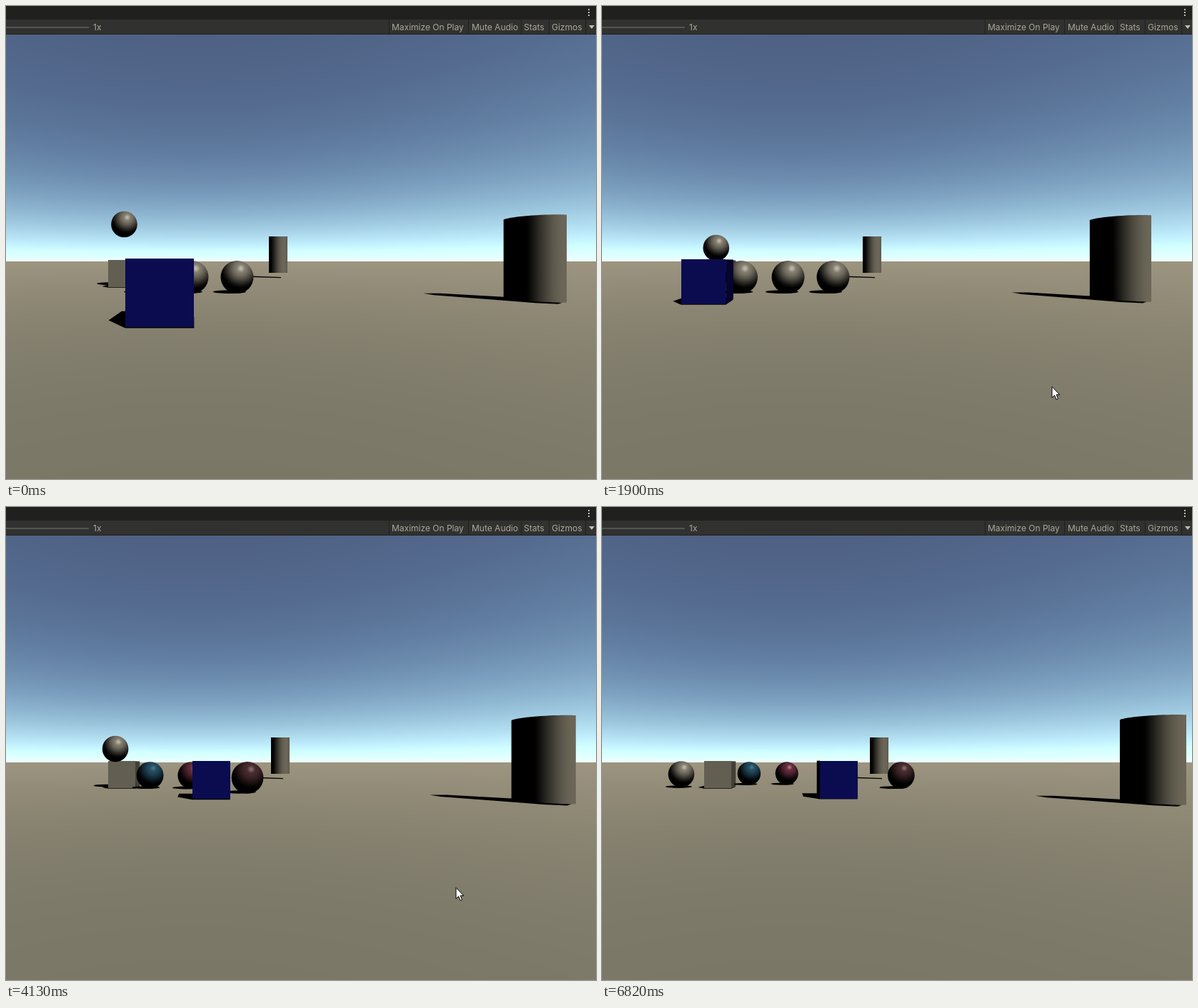
Write an HTML page with a canvas that moves like this. It is 826x663 px and loops after 6.9 s.

```html
<!DOCTYPE html>
<html lang="en">
<head>
<meta charset="utf-8">
<title>Game view</title>
<style>
  html, body { margin: 0; width: 100%; height: 100%; overflow: hidden; background: #20201f; }
  canvas { display: block; }
</style>
</head>
<body>
<canvas id="view" width="826" height="663"></canvas>
<script>
const W = 826, H = 663, LOOP = 6900;

// Camera: vanishing point, focal length and height above the ground.
const VX = 263, VY = 358, FOCAL = 463, EYE = 0.955;
// Shadow shift per unit of height: to the left and away from the camera.
const SHIFT_X = -0.41, SHIFT_Z = 0.65;

const GRAY = [142, 135, 120], TEAL = [38, 84, 106], MAROON = [110, 50, 68], BROWN = [80, 48, 52];
const ctx = document.getElementById('view').getContext('2d');

const clamp = v => Math.min(1, Math.max(0, v));
const mix = (a, b, k) => a + (b - a) * k;
const progress = (t, from, to) => clamp((t - from) / (to - from));
const rgb = (color, light) => `rgb(${color.map(c => Math.round(c * light))})`;

function rect(g, x, y, w, h, fill) {
  const left = Math.round(x), top = Math.round(y);
  g.fillStyle = fill;
  g.fillRect(left, top, Math.round(x + w) - left, Math.round(y + h) - top);
}

function polygon(points, fill) {
  ctx.fillStyle = fill;
  ctx.beginPath();
  points.forEach(([x, y]) => ctx.lineTo(x, y));
  ctx.closePath();
  ctx.fill();
}

function ellipse(x, y, rx, ry, fill) {
  ctx.fillStyle = fill;
  ctx.beginPath();
  ctx.ellipse(x, y, rx, ry, 0, 0, Math.PI * 2);
  ctx.fill();
}

// Sky and ground fade exponentially with the elevation of the view ray.
function skyColor(e) {
  return [74 + 165 * Math.exp(-6.4 * e), 88 + 198 * Math.exp(-5.4 * e), 120 + 168 * Math.exp(-4.6 * e)];
}

function groundColor(e) {
  const glow = Math.exp(-5 * e);
  return [120 + 37 * glow, 117 + 32 * glow, 101 + 27 * glow];
}

function makeBackdrop() {
  const layer = document.createElement('canvas');
  layer.width = W;
  layer.height = H;
  const g = layer.getContext('2d'), image = g.createImageData(W, H);
  for (let y = 40; y < H; y++) {
    for (let x = 0; x < W; x++) {
      const dy = VY - y, e = dy / Math.hypot(FOCAL, x - VX, dy);
      image.data.set([...(e > 0 ? skyColor(e) : groundColor(-e)), 255], (y * W + x) * 4);
    }
  }
  g.putImageData(image, 0, 0);
  drawToolbar(g);
  return layer;
}

function drawToolbar(g) {
  rect(g, 0, 0, W, 19, '#20201e');
  rect(g, 0, 19, W, 20, '#31312f');
  rect(g, 0, 39, W, 1, '#20201e');
  rect(g, 0, 29, 116, 2, '#555550');
  for (const x of [536, 647, 721, 760, 811]) rect(g, x, 19, 1, 20, '#20201e');
  for (const y of [4, 8, 12]) rect(g, 815, y, 2, 2, '#c0bdae');
  g.fillStyle = '#aba898';
  g.font = '12px Inter, "Liberation Sans", sans-serif';
  const labels = [['1x', 122], ['Maximize On Play', 540], ['Mute Audio', 652], ['Stats', 725], ['Gizmos', 764]];
  for (const [text, x] of labels) g.fillText(text, x, 34);
  g.fillStyle = '#c0bdae';
  g.beginPath();
  g.moveTo(816, 27);
  g.lineTo(824, 27);
  g.lineTo(820, 32);
  g.fill();
}

// A unit cube; x is its left side and z its front, in world units.
function drawCube(x, z, front, rightSide) {
  const s = FOCAL / z, back = FOCAL / (z + 1);
  const ground = (dx, dz) => {
    const scale = FOCAL / (z + dz);
    return [VX + (x + dx) * scale, VY + (EYE + .015) * scale];
  };
  polygon([ground(0, 0), ground(SHIFT_X, SHIFT_Z), ground(SHIFT_X, 1 + SHIFT_Z),
           ground(1 + SHIFT_X, 1 + SHIFT_Z), ground(1, 1), ground(1, 0)], '#000');
  const side = (edge, fill) => polygon([
    [VX + edge * s, VY - (1 - EYE) * s], [VX + edge * back, VY - (1 - EYE) * back],
    [VX + edge * back, VY + EYE * back], [VX + edge * s, VY + EYE * s]], fill);
  if (x + 1 < 0) side(x + 1, rightSide);
  if (x > 0) side(x, '#000005');
  rect(ctx, VX + x * s, VY - (1 - EYE) * s, s, s, front);
}

// A sphere is one unit wide, so its radius gives its depth.
function drawSphereShadow({ x, y, r }) {
  const size = 2 * r, z = FOCAL / size;
  const height = (VY + EYE * size - y) / size;
  const shrink = z / (z + height * SHIFT_Z);
  ellipse(VX + (x - VX + height * SHIFT_X * size) * shrink, VY + EYE * size * shrink,
          r * 1.04 * shrink, r * .1, '#000');
}

function drawSphere({ x, y, r, color }) {
  const lx = x + r * .23, ly = y - r * .53;
  const shade = ctx.createRadialGradient(lx, ly, 0, lx, ly, r * 1.2);
  for (let s = 0; s <= 1; s += .125) shade.addColorStop(s, rgb(color, Math.cos(s * Math.PI / 2) ** 1.3));
  ellipse(x, y, r, r, shade);
  const glint = ctx.createRadialGradient(lx, ly, 0, lx, ly, r * .25);
  glint.addColorStop(0, `rgba(235,230,215,${.1 + color[0] / 280})`);
  glint.addColorStop(1, 'rgba(235,230,215,0)');
  ellipse(lx, ly, r * .25, r * .25, glint);
}

// Light falls off from the peak as a cosine around the barrel.
function cylinderShade(x, w, peak, spread) {
  const shade = ctx.createLinearGradient(x, 0, x + w, 0);
  for (let s = 0; s <= 1; s += .0625) {
    const angle = Math.min(1, Math.abs(s - peak) / spread) * Math.PI / 2;
    shade.addColorStop(s, rgb([107, 102, 88], Math.cos(angle) ** 1.15));
  }
  return shade;
}

function drawSmallCylinder(x) {
  polygon([[x - 24, 378.5], [x + 17, 380], [x + 17, 381.3], [x - 24, 380]], '#000');
  rect(ctx, x, 323, 26, 51, cylinderShade(x, 26, .8, .7));
}

function drawBigCylinder(right) {
  const grow = right - 775, w = 87 + grow * .14, x = right - w;
  const top = 293 - grow * .04, bottom = 415 + grow * .065;
  polygon([[x - w * 1.27, bottom - 13], [x - w, bottom - 13], [x, bottom - 8], [right - 6, bottom],
           [right - 12, bottom + 2], [x + w * .5, bottom + .5], [x, bottom - 3], [x - w * 1.1, bottom - 10.5]], '#000');
  ctx.fillStyle = cylinderShade(x, w, 1, .64);
  ctx.beginPath();
  ctx.moveTo(x, top + 7);
  ctx.bezierCurveTo(x + w * .08, top + 2.5, x + w * .7, top - 1.5, right, top);
  ctx.lineTo(right, bottom);
  ctx.bezierCurveTo(x + w * .8, bottom + .5, x + w * .1, bottom - 4, x, bottom - 6);
  ctx.fill();
}

function drawCursor(x, y) {
  ctx.save();
  ctx.translate(x, y);
  ctx.beginPath();
  for (const [px, py] of [[0, .5], [0, 16], [3.6, 12.7], [6, 18.5], [8.5, 17.5], [6.1, 11.8], [10.8, 11.8]]) ctx.lineTo(px, py);
  ctx.closePath();
  ctx.fillStyle = '#fff';
  ctx.strokeStyle = '#000';
  ctx.fill();
  ctx.stroke();
  ctx.restore();
}

// The player's turning points: time, world x, world z.
const route = [[0, -.995, 4.8], [750, -1.75, 4.8], [1300, -2.75, 5.75], [1600, -2.75, 7.1],
               [3290, -.99, 8.82], [4820, .727, 8.42], [5300, .793, 8.74]];

function cubeAt(t) {
  const i = Math.max(1, route.findLastIndex(p => p[0] <= t) + 1);
  const a = route[i - 1], b = route[i] || a;
  const k = a === b ? 0 : progress(t, a[0], b[0]);
  return [mix(a[1], b[1], k), mix(a[2], b[2], k)];
}

// Spheres rest until the cube hits them, then roll away and take a new colour.
const spheres = [
  { hit: 2800, x: [195, 206], r: [23, 16.2], ease: .45, paint: () => TEAL },
  { hit: 3050, x: [260.5, 258.7], r: [23, 16], ease: .45, paint: t => t < 3700 ? TEAL : MAROON },
  { hit: 3750, x: [323.5, 421], r: [23, 18.8], ease: .9, paint: () => BROWN }
];

function sphereAt({ hit, x, r, ease, paint }, t) {
  const k = progress(t, hit, LOOP) ** ease, radius = mix(...r, k);
  return { x: mix(...x, k), y: VY + EYE * radius, r: radius, color: t < hit ? GRAY : paint(t) };
}

// The ball drops onto the crate, rolls slowly and falls off its left edge.
function ballAt(t) {
  const seconds = t / 1000;
  const drop = 33 * progress(t, 0, 430) ** 2, fall = 35.5 * progress(t, 5900, 6700) ** 2;
  const x = 165.5 - 3 * seconds - 8 * Math.max(0, seconds - 5.2) ** 3;
  return { x, y: 306 + drop + fall, r: 18.3, color: GRAY };
}

const cylinderRight = t => 785 - 16 * progress(t, 0, 1900) ** 2 + 49 * progress(t, 1900, 5700);

const backdrop = makeBackdrop();

function draw(t) {
  const ball = ballAt(t), rolling = spheres.map(s => sphereAt(s, t)), right = cylinderRight(t);

  ctx.drawImage(backdrop, 0, 0);
  drawSphereShadow(ball);
  drawSmallCylinder(Math.round(368 + (right - 785) * .2));
  drawCube(-3.16, 12.2, '#625f52', '#423f35');
  drawSphere(ball);
  rolling.forEach(drawSphereShadow);
  rolling.forEach(drawSphere);
  drawCube(...cubeAt(t), '#0b0b50', '#05052e');
  drawBigCylinder(right);

  if (t > 250 && t < 6650) {
    const away = 1 - progress(t, 250, 600) + progress(t, 6350, 6650) * 2.2;
    drawCursor(630 + 18 * away, 533 + 57 * away);
  }
}

const start = performance.now();
function tick() {
  draw((performance.now() - start) % LOOP);
  requestAnimationFrame(tick);
}
tick();
</script>
</body>
</html>
```
